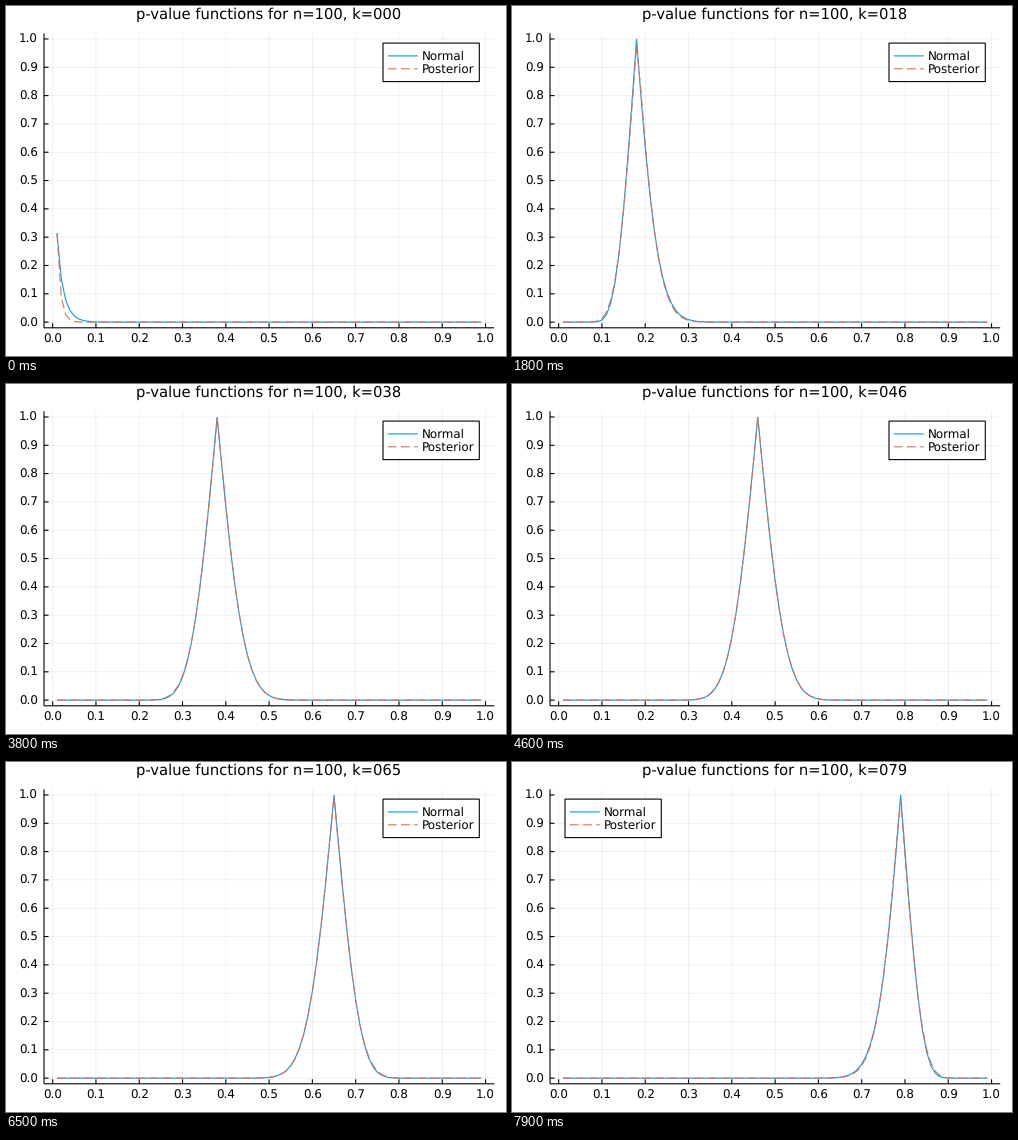
Write a matplotlib script that moves like this. It is 500 px wide and 350 px high and loops after 8000 ms.

```python
import math

import matplotlib.pyplot as plt
import numpy as np
from matplotlib.animation import FuncAnimation
from matplotlib.patches import Rectangle

W, H, DPI = 500, 350, 100
PX = 72 / DPI
N, FRAMES, INTERVAL = 100, 80, 100
BLUE, ORANGE = "#009afa", "#e36f47"
LEFT, RIGHT, TOP, BOTTOM = 38.0, 488.2, 27.3, 321.8
LOW, HIGH = -0.02, 1.02
LINE = 1.1
DASH = (0, (8, 4))
LEGEND_X, LEGEND_Y = 377.0, 37.1
LEGEND_SHIFT = -324

plt.rcParams["font.family"] = "DejaVu Sans"
plt.rcParams["text.hinting"] = "none"

fig = plt.figure(figsize=(W / DPI, H / DPI), dpi=DPI, facecolor="white")
ax = fig.add_axes([0, 0, 1, 1])
ax.set_xlim(0, W)
ax.set_ylim(H, 0)
ax.axis("off")


def to_x(v):
    return LEFT + (v - LOW) / (HIGH - LOW) * (RIGHT - LEFT)


def to_y(v):
    return BOTTOM - (v - LOW) / (HIGH - LOW) * (BOTTOM - TOP)


def line(xs, ys, color="black", width=LINE, **kw):
    return ax.plot(xs, ys, color=color, lw=width * PX, snap=False,
                   solid_capstyle="butt", solid_joinstyle="miter", **kw)[0]


def label(x, y, text, size=11.85, ha="left", z=3):
    return ax.text(x, y, text, fontsize=size * PX, ha=ha, va="baseline", zorder=z)


p = np.arange(1, N) / N
theta = np.linspace(0, math.pi / 2, 20001)
p_theta = np.arcsin(np.sqrt(p))


def normal_pvalue(k):
    z = np.abs(k - N * p) / np.sqrt(N * p * (1 - p))
    return np.array([math.erfc(v / math.sqrt(2)) for v in z])


def posterior_pvalue(k):
    # Beta(k + 1/2, N - k + 1/2), integrated with p = sin(theta)^2
    s, c = np.sin(theta), np.cos(theta)
    dens = s ** (2 * k) * c ** (2 * (N - k))
    cdf = np.concatenate([[0], np.cumsum(dens[1:] + dens[:-1])])
    cdf = np.interp(p_theta, theta, cdf / cdf[-1])
    return 2 * np.minimum(cdf, 1 - cdf)


for i in range(11):
    v = i / 10
    x, y = to_x(v), to_y(v)
    line([x, x], [TOP, BOTTOM], width=LINE / 2, alpha=0.1, zorder=0)
    line([LEFT, RIGHT], [y, y], width=LINE / 2, alpha=0.1, zorder=0)
    line([x, x], [BOTTOM, BOTTOM - 4.5], zorder=1)
    line([LEFT, LEFT + 4.5], [y, y], zorder=1)
    label(x, 336.4, f"{v:.1f}", ha="center")
    label(31.8, y + 4.3, f"{v:.1f}", ha="right")
line([LEFT, RIGHT], [BOTTOM, BOTTOM], zorder=1)
line([LEFT, LEFT], [TOP, BOTTOM], zorder=1)

title = label((LEFT + RIGHT) / 2, 12.7, "", size=14.8, ha="center")
normal = line([], [], BLUE, zorder=2)
posterior = line([], [], ORANGE, ls=DASH, zorder=2.1)

box = Rectangle((LEGEND_X, LEGEND_Y), 96.3, 38.5, fc="white", ec="black",
                lw=LINE * PX, snap=False, zorder=4)
ax.add_patch(box)
keys, names = [], []
for y, name, color, style in ((49.9, "Normal", BLUE, "-"), (62.8, "Posterior", ORANGE, DASH)):
    keys.append(line([], [], color, ls=style, zorder=5))
    keys[-1].set_ydata([y, y])
    names.append(label(0, y + 4.3, name, z=5))


def place_legend(x):
    box.set_x(x)
    for key, name in zip(keys, names):
        key.set_xdata([x + 4.8, x + 34.8])
        name.set_x(x + 38.8)


def update(k):
    title.set_text(f"p-value functions for n={N}, k={k:03d}")
    a, b = normal_pvalue(k), posterior_pvalue(k)
    normal.set_data(to_x(p), to_y(a))
    posterior.set_data(to_x(p), to_y(b))
    # The legend moves left once a curve enters the top right corner
    corner = p > 0.759
    crowded = max(a[corner].max(), b[corner].max()) > 0.76
    place_legend(LEGEND_X + (LEGEND_SHIFT if crowded else 0))
    return normal, posterior, title, box, *keys, *names


anim = FuncAnimation(fig, update, frames=FRAMES, interval=INTERVAL,
                     repeat=True, repeat_delay=0, blit=False)
plt.show()
```
